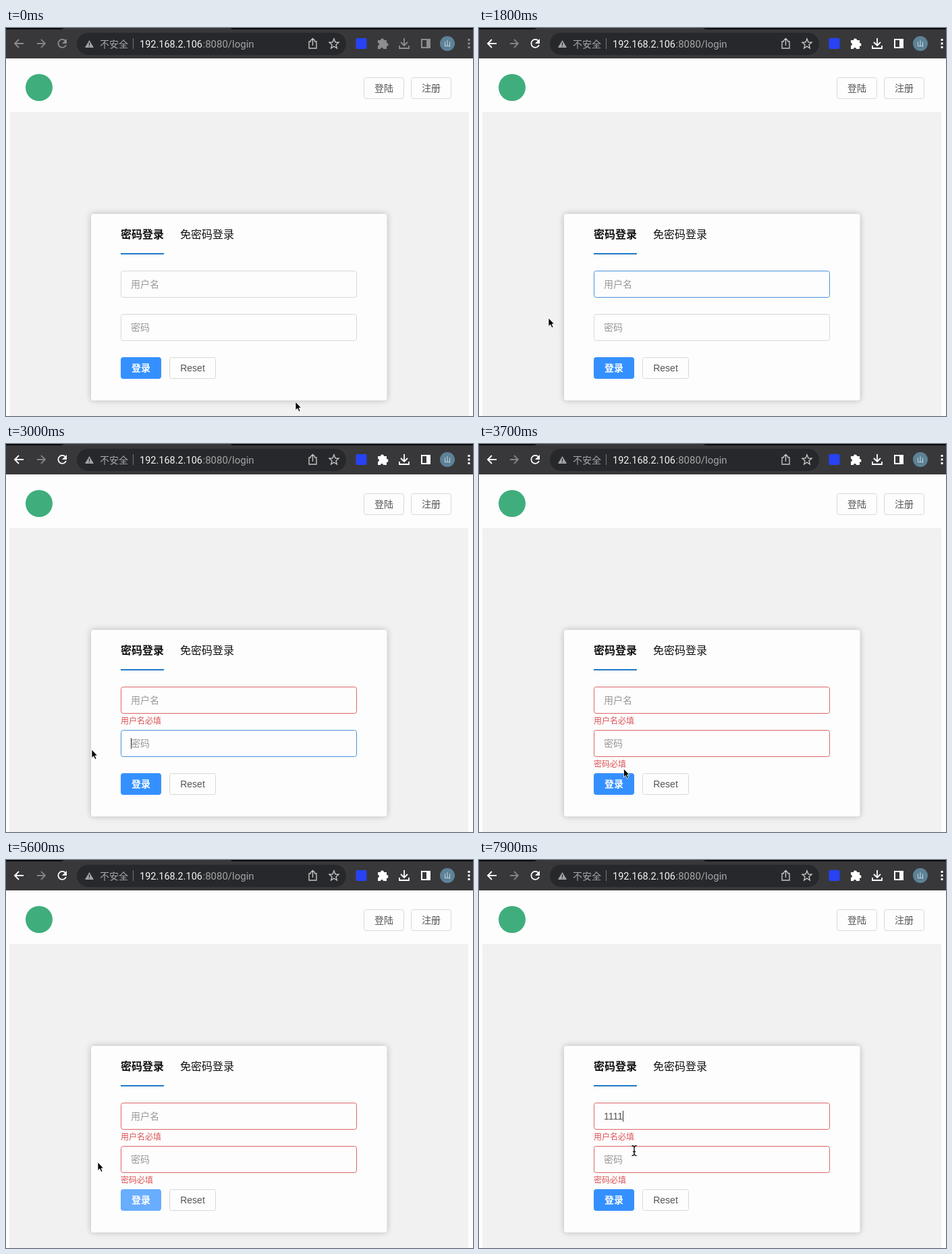
An HTML page for the animation above (8 s loop, 692 by 574 pixels).

```html
<!DOCTYPE html>
<html lang="zh">
<head>
<meta charset="utf-8">
<style>
html, body { margin: 0; width: 100%; height: 100%; overflow: hidden; background: #fdfdfd; }
svg { display: block; width: 692px; height: 574px; }
text { font: 14px "Liberation Sans", "Noto Sans CJK SC", "Noto Sans CJK", sans-serif; fill: #555; }
.cjk { font-family: "Noto Sans CJK SC", "Noto Sans CJK", sans-serif; }
.url { font-family: Roboto, sans-serif; }
.mid { text-anchor: middle; }
.strong { font-weight: 500; }
.bold { font-weight: 700; }
.tab { font-size: 16px; fill: #111; }
.hint { fill: #999; }
.error { font-size: 12px; fill: #dd5254; }
.box { fill: #fdfdfd; stroke: #d7d8db; }
.line { fill: none; stroke-width: 1.8; }
#card { filter: drop-shadow(0 0 5px rgba(0, 0, 0, .24)); }
</style>
</head>
<body>
<svg viewBox="0 0 692 574">
  <!-- browser bar -->
  <rect width="692" height="45" fill="#38383b"/>
  <path d="M0 0H86Q84 2 80 2H0ZM332 0H692V2H338Q334 2 332 0Z" fill="#0b0b0c"/>
  <rect x="105" y="7" width="399" height="33" rx="16.5" fill="#27282b"/>
  <path class="line" d="M58 23H46M52 17l6 6-6 6" stroke="#838386"/>
  <g id="active">
    <path class="line" d="M13 23H26M19 17l-6 6 6 6M88 19a6 6 0 1 0 1 6" stroke="currentColor"/>
    <path d="M90 16v7h-7z" fill="currentColor"/>
    <path d="M551 18h4a2.5 2.5 0 1 1 5 0h4v4a2.5 2.5 0 1 1 0 5v4h-5a2 2 0 1 0-4 0h-4v-5a2 2 0 1 0 0-4z" fill="currentColor"/>
    <path class="line" d="M590 15v10M585 21l5 5 5-5M583 26v4h14v-4" stroke="currentColor"/>
    <path d="M615 16h14v14h-14zm2 2v10h6V18z" fill="currentColor" fill-rule="evenodd"/>
    <path d="M686 16v3m0 2.500v3m0 2.500v3" stroke="currentColor" stroke-width="3"/>
  </g>
  <path d="M123.500 18L130 29H117Z" fill="#a5a5a8"/>
  <path d="M123.500 21.500v4m0 1v1.300" stroke="#27282b" stroke-width="1.300"/>
  <text class="cjk" x="139" y="28.500" style="fill:#a5a5a8">不安全</text>
  <path d="M188.500 15v16" stroke="#77777a"/>
  <text class="url" x="198" y="28.500" style="font-size:14.500px;fill:#f4f4f4">192.168.2.106</text>
  <text class="url" x="291.500" y="28.500" style="font-size:15px;fill:#a5a5a8">:8080/login</text>
  <g fill="none" stroke="#c3c3c5" stroke-width="1.400">
    <path d="M452 20h-3v10h11V20h-3M454.500 26V16M451 19l3.500-3.500 3.500 3.500"/>
    <path d="M486 16l2 5 5 .4-4 3.400 1.300 5.200-4.300-2.800-4.300 2.800 1.300-5.200-4-3.400 5-.4z"/>
  </g>
  <rect x="518.500" y="15" width="16" height="16" rx="2" fill="#2842f4"/>
  <circle cx="654" cy="23" r="11" fill="#5c8297"/>
  <text class="cjk mid" x="654" y="27" style="font-size:10px;fill:#e2e9ed">山</text>

  <!-- page -->
  <rect id="page" x="5" y="124" width="680" height="450" fill="#f1f1f1"/>
  <circle cx="49" cy="88" r="20" fill="#3fae7c"/>
  <rect class="box" x="530.500" y="73.500" width="59" height="31" rx="3"/>
  <rect class="box" x="600.500" y="73.500" width="59" height="31" rx="3"/>
  <text class="cjk mid strong" x="560" y="94">登陆</text>
  <text class="cjk mid strong" x="630" y="94">注册</text>

  <rect id="card" x="126" y="275" width="438.500" height="276" rx="4" fill="#fdfdfd"/>
  <text class="cjk tab bold" x="170" y="311">密码登录</text>
  <text class="cjk tab" x="258" y="311">免密码登录</text>
  <path d="M170 334h64" stroke="#1f7ac8" stroke-width="2"/>
  <rect id="user" class="box" x="170.500" y="359.500" width="349" height="39" rx="3"/>
  <rect id="pass" class="box" x="170.500" y="423.500" width="349" height="39" rx="3"/>
  <text id="userText" x="185" y="384"></text>
  <text class="cjk hint" x="185" y="448">密码</text>
  <text id="userError" class="cjk error" x="170" y="413.500">用户名必填</text>
  <text id="passError" class="cjk error" x="170" y="477.500">密码必填</text>
  <path id="caret" d="M0 0v16" stroke="#333"/>
  <rect id="login" x="170" y="487" width="60" height="32" rx="4"/>
  <text class="cjk mid bold" x="200" y="508" style="fill:#fff">登录</text>
  <rect id="reset" class="box" x="242.500" y="487.500" width="68" height="31" rx="3"/>
  <text id="resetText" class="mid" x="276.500" y="508">Reset</text>

  <!-- pointers, each with its hot spot at 0,0 -->
  <g id="pointer">
    <path id="arrow" d="M0 0V12.500L2.800 9.800 5 14.500 7 13.500 5 9H8.500Z" fill="#000" stroke="#fff" stroke-width=".8"/>
    <path id="beam" d="M-3.500-7.500Q0-7 0-5Q0-7 3.500-7.500M0-5V5M-3.500 7.500Q0 7 0 5Q0 7 3.500 7.500M-2 1.500H2" fill="none" stroke="#111" stroke-width="1.400"/>
    <path id="hand" d="M-1.500 1Q0-1.500 1.500 1L3 6Q4.500 4.500 5.500 6.500Q7 5 8 7Q10 6 10 8.500V12L8.500 17H1.500L-4 10.500Q-4.500 8 -1.500 9.500Z" fill="#fff" stroke="#111" stroke-width="1.200"/>
  </g>
</svg>
<script>
const LOOP = 8000, STEP = 100;
const path = [ // time, x, y
  [0, 429, 553], [300, 425, 545], [800, 297, 384], [1400, 297, 384],
  [1800, 103, 429], [2100, 103, 429], [2500, 230, 446], [2650, 230, 446],
  [3000, 127, 452], [3400, 127, 452], [3900, 262, 496], [4700, 262, 496],
  [5000, 200, 502], [5250, 200, 502], [5600, 136, 447], [5800, 136, 447],
  [6200, 230, 384], [7500, 230, 384], [7900, 230, 430], [LOOP, 230, 430]
];
const focusLog = [ // time, focused control
  [0, ''], [1200, 'user'], [2100, ''], [2600, 'pass'], [3400, ''],
  [4000, 'reset'], [5200, 'login'], [6300, 'user']
];
const keyTimes = [6900, 7100, 7300, 7500];
const $ = id => document.getElementById(id);
const show = (id, on) => $(id).style.display = on ? '' : 'none';
const paint = (id, fill, stroke) => Object.assign($(id).style, { fill, stroke });

function pointerAt(t) {
  const i = path.findIndex(p => p[0] > t), [t0, x0, y0] = path[i - 1], [t1, x1, y1] = path[i];
  const u = (t - t0) / (t1 - t0), k = u * u * (3 - 2 * u);
  return [x0 + (x1 - x0) * k, y0 + (y1 - y0) * k];
}

function hit(x, y) {
  const within = (l, t, w, h) => x >= l && x < l + w && y >= t && y < t + h;
  if (within(170, 359, 350, 40)) return 'user';
  if (within(170, 423, 350, 40)) return 'pass';
  if (within(170, 487, 60, 32)) return 'login';
  if (within(242, 487, 69, 32)) return 'reset';
  return '';
}

function draw(t) {
  const [x, y] = pointerAt(t), over = hit(x, y);
  const [since, focus] = focusLog.filter(f => f[0] <= t).pop();
  const typed = keyTimes.filter(k => k <= t);
  const bad = {
    user: t >= 2100 && t < 4000 || t >= 5200,
    pass: t >= 3400 && t < 4000 || t >= 5200
  };

  $('active').style.color = t < 300 ? '#8d8d90' : '#fff';
  $('page').setAttribute('x', t < 300 ? 6 : 5);

  for (const id of ['user', 'pass']) {
    paint(id, '', bad[id] ? '#dc6668' : focus === id ? '#4b93d8' : over === id ? '#c4c7cc' : '');
    show(id + 'Error', bad[id]);
  }
  const name = $('userText');
  name.textContent = typed.length ? '1'.repeat(typed.length) : '用户名';
  name.setAttribute('class', typed.length ? '' : 'cjk hint');

  const blinkStart = Math.max(since, ...typed);
  show('caret', (focus === 'user' || focus === 'pass') && (t - blinkStart) % 1000 < 500);
  const caretX = typed.length ? 185.5 + Math.round(name.getComputedTextLength()) : 185.5;
  $('caret').setAttribute('transform', `translate(${caretX} ${focus === 'pass' ? 435 : 371})`);

  paint('login', over === 'login' || focus === 'login' ? '#69adff' : '#3490ff', 'none');
  const lit = over === 'reset' || focus === 'reset';
  paint('reset', lit ? '#e5f0fd' : '', lit ? '#bddaf8' : '');
  paint('resetText', lit ? '#3a8fe8' : '', '');

  const kind = !over ? 'arrow' : over === 'user' || over === 'pass' ? 'beam' : 'hand';
  for (const id of ['arrow', 'beam', 'hand']) show(id, id === kind);
  $('pointer').setAttribute('transform', `translate(${x} ${y})`);
}

const start = performance.now();
function frame() {
  const t = (performance.now() - start) % LOOP;
  draw(Math.floor(t / STEP) * STEP);
  requestAnimationFrame(frame);
}
frame();
</script>
</body>
</html>
```
